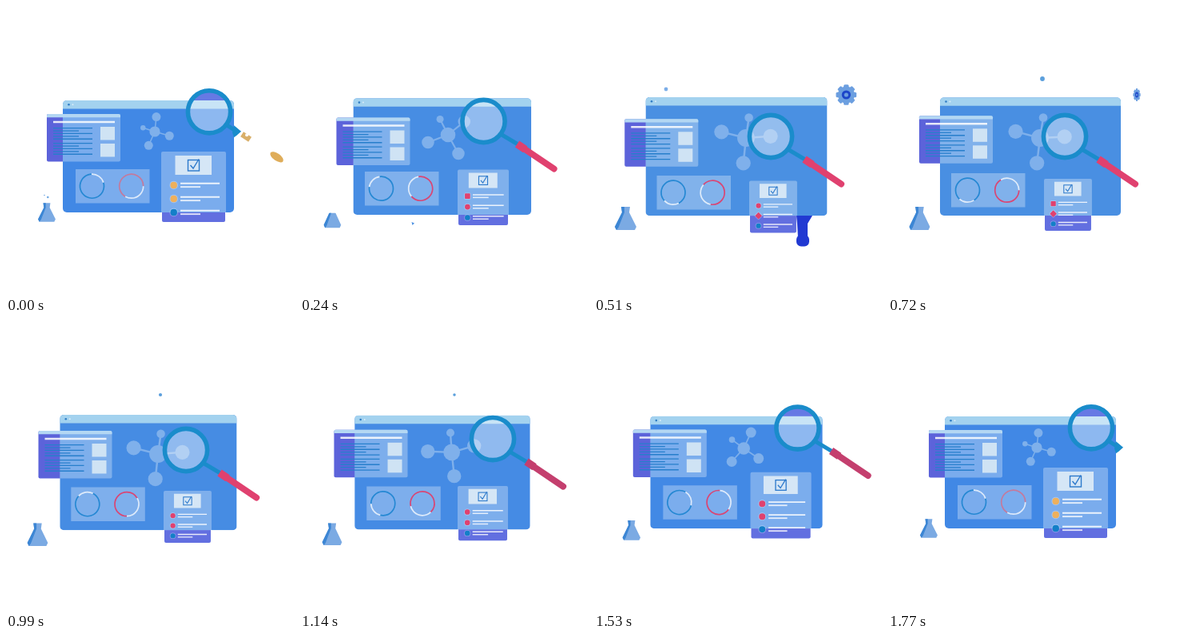
An HTML page with a canvas for the animation above (1800 ms loop, 360x360 px).

```html
<!DOCTYPE html>
<html lang="en">
<head>
<meta charset="utf-8">
<title>Research dashboard</title>
<style>
html, body { margin: 0; width: 100%; height: 100%; overflow: hidden; background: #fff; }
canvas { display: block; width: 360px; height: 360px; }
</style>
</head>
<body>
<canvas id="stage" width="360" height="360"></canvas>
<script>
const ctx = document.getElementById('stage').getContext('2d');
const LOOP = 1800, STEP = 30;
const TIMES = [0, 240, 510, 720, 990, 1290, 1770];
const PURPLE = '#5c63da', BLUE = '#1a8ccb', RED = '#e0416f', ORANGE = '#eeb05c';

// Monotone cubic through the pose values, at rest on both ends
function pose(t, v) {
  const last = TIMES.length - 1;
  if (t >= TIMES[last]) return v[last];
  let i = 0;
  while (t >= TIMES[i + 1]) i++;
  const sec = k => (v[k + 1] - v[k]) / (TIMES[k + 1] - TIMES[k]);
  const slope = k => {
    if (k === 0 || k === last) return 0;
    const a = sec(k - 1), b = sec(k);
    return a * b <= 0 ? 0 : 2 * a * b / (a + b);
  };
  const h = TIMES[i + 1] - TIMES[i], u = (t - TIMES[i]) / h, w = 1 - u;
  return v[i] * (1 + 2 * u) * w * w + slope(i) * h * u * w * w
    + v[i + 1] * u * u * (3 - 2 * u) - slope(i + 1) * h * u * u * w;
}

const white = a => `rgba(255,255,255,${a})`;
const within = (t, a, b) => t >= a && t < b;

function box(x, y, w, h, fill, r = 0) {
  ctx.fillStyle = fill;
  ctx.beginPath();
  ctx.roundRect(x, y, w, h, r);
  ctx.fill();
}

function disc(x, y, r, fill) {
  ctx.fillStyle = fill;
  ctx.beginPath();
  ctx.arc(x, y, r, 0, Math.PI * 2);
  ctx.fill();
}

function line(x1, y1, x2, y2, color, width, cap = 'butt') {
  ctx.strokeStyle = color;
  ctx.lineWidth = width;
  ctx.lineCap = cap;
  ctx.beginPath();
  ctx.moveTo(x1, y1);
  ctx.lineTo(x2, y2);
  ctx.stroke();
}

function arc(x, y, r, from, to, color, width) {
  ctx.strokeStyle = color;
  ctx.lineWidth = width;
  ctx.lineCap = 'butt';
  ctx.beginPath();
  ctx.arc(x, y, r, from, to);
  ctx.stroke();
}

function poly(points, fill) {
  ctx.fillStyle = fill;
  ctx.beginPath();
  points.forEach(([x, y]) => ctx.lineTo(x, y));
  ctx.closePath();
  ctx.fill();
}

function clipped(w, draw) {
  ctx.save();
  ctx.beginPath();
  ctx.roundRect(w.x, w.y, w.w, w.h, 5);
  ctx.clip();
  draw();
  ctx.restore();
}

function drawWindow(w) {
  const k = (w.w - 214) / 13;
  const mix = (a, b) => Math.round(a + (b - a) * k);
  clipped(w, () => {
    box(w.x, w.y, w.w, w.h, `rgb(${mix(65, 74)},${mix(136, 144)},${mix(229, 226)})`);
    box(w.x, w.y, w.w, 10.5, '#a3d2ef');
  });
  disc(w.x + 7.5, w.y + 5.3, 1.3, '#2f7cc4');
  disc(w.x + 12.5, w.y + 5.3, 1, white(0.6));
}

function drawMolecule(t) {
  const x = pose(t, [186, 185, 190, 190, 190, 189, 186]);
  const y = pose(t, [157, 161, 165, 165, 165, 160, 157]);
  const s = pose(t, [1, 1.41, 1.66, 1.66, 1.65, 1.45, 1]);
  const turn = pose(t, [0, 45, 80, 81, 80, 49, 0]);
  const color = '#7fb0eb';
  const nodes = [[-84, 18.5, 5.5], [16, 19, 5.5], [114, 19, 5.5], [198, 15.5, 3.2]];
  for (const [deg, dist, r] of nodes) {
    const a = (deg + turn) * Math.PI / 180;
    const nx = x + Math.cos(a) * dist * s, ny = y + Math.sin(a) * dist * s;
    line(x, y, nx, ny, color, 1.5 * s);
    disc(nx, ny, r * s, color);
  }
  disc(x, y, 6.6 * s, color);
}

function drawTextCard(x, y, w) {
  clipped(w, () => box(x, y, 92, 59.5, white(0.3), 2));
  box(x, y, 92, 4.3, '#b3d7f3', [2, 2, 0, 0]);
  box(x + 8, y + 8.7, 77, 2.6, white(0.85));
  for (const top of [17, 36]) {
    for (let i = 0; i < 5; i++) {
      box(x + 8, y + top + i * 3.4, i % 2 ? 32 : 49, 1.3, '#277fcc');
    }
  }
  for (const top of [16, 37]) box(x + 67, y + top, 18, 16.5, '#cfe3f4');
}

function drawRings(t) {
  const x = pose(t, [87, 81, 78.5, 79, 81.3, 85, 87]);
  const y = pose(t, [204, 207, 212, 209, 206.5, 205, 204]);
  const turns = [
    pose(t, [-55, -135, -260, -265, -460, -670, -775]),
    pose(t, [60, 200, 520, 660, 750, 910, 1140])
  ];
  const warm = within(t, 60, 1650) ? '#d94674' : '#c37a9d';
  box(x, y, 92.5, 42.5, white(0.3));
  turns.forEach((turn, i) => {
    const cx = x + 20.5 + i * 49.2, cy = y + 21.2;
    const mid = turn * Math.PI / 180, half = i ? 1.05 : 0.65;
    arc(cx, cy, 15, mid + half, mid - half + Math.PI * 2, i ? warm : '#2588d3', 1.7);
    arc(cx, cy, 15, mid - half, mid + half, white(0.75), 1.7);
  });
}

function drawMark(t, row) {
  const red = within(t, 60, 1620) ? RED : ORANGE;
  const square = row === 0 && (within(t, 150, 380) || within(t, 630, 850));
  const diamond = row === 1 && within(t, 400, 860);
  const r = square || diamond ? 1 : 4;
  ctx.save();
  if (diamond) ctx.rotate(Math.PI / 4);
  box(-5.2, -5.2, 10.4, 10.4, white(0.3), r + 1);
  box(-4.2, -4.2, 8.4, 8.4, row === 2 ? '#137fc8' : red, r);
  ctx.restore();
}

function drawListCard(t, c, w) {
  clipped(w, () => box(c.x, c.y, 81 * c.s, 88 * c.s, white(0.3), 2));
  ctx.save();
  ctx.translate(c.x, c.y);
  ctx.scale(c.s, c.s);
  box(17.5, 5, 45.5, 24, '#d5e6f6');
  ctx.strokeStyle = '#2c79cb';
  ctx.lineWidth = 1.4;
  ctx.strokeRect(33.5, 10.5, 14, 13.5);
  ctx.beginPath();
  ctx.moveTo(36.5, 17);
  ctx.lineTo(40, 21);
  ctx.lineTo(47, 9.5);
  ctx.stroke();
  for (let i = 0; i < 3; i++) {
    const y = 42 + i * 17;
    box(24, y - 3.2, 49, 1.9, white(0.85));
    box(24, y + 1.2, 25, 1.9, white(0.8));
    ctx.save();
    ctx.translate(15.7, y);
    drawMark(t, i);
    ctx.restore();
  }
  ctx.restore();
}

function drawLens(t, x, y, w) {
  const held = within(t, 60, 1650);
  clipped(w, () => disc(x, y, 27, white(0.4)));
  line(x + 22, y + 16.5, x + (held ? 43 : 36), y + (held ? 29 : 25.5), BLUE, 5);
  arc(x, y, 26.6, 0, Math.PI * 2, BLUE, 5.6);
  if (held) {
    const grip = within(t, 1140, 1650) ? '#c43f6e' : RED;
    line(x + 42, y + 28.5, x + 52, y + 35.2, grip, 9.5);
    line(x + 46, y + 31.2, x + 88, y + 59.5, grip, 8, 'round');
    return;
  }
  poly([[x + 31, y + 17], [x + 40, y + 24.5], [x + 35, y + 29], [x + 31, y + 32], [x + 29, y + 26]], BLUE);
  if (t < 60) {
    line(x + 41, y + 28, x + 51, y + 34.5, '#d9b06a', 7);
    disc(x + 47, y + 29, 2, '#fff');
    ctx.fillStyle = '#dfad5a';
    ctx.beginPath();
    ctx.ellipse(x + 84.5, y + 56.5, 9.5, 4.6, 0.6, 0, Math.PI * 2);
    ctx.fill();
  }
}

function drawFlask(t) {
  const x = pose(t, [51, 40.5, 39.5, 39.5, 39.5, 41.5, 51]);
  const y = pose(t, [269.7, 277.3, 280, 280, 280, 277.3, 269.7]);
  const sx = pose(t, [0.81, 0.8, 1, 0.96, 0.95, 0.87, 0.81]);
  const sy = pose(t, [0.81, 0.88, 1, 1, 0.98, 0.92, 0.81]);
  ctx.save();
  ctx.translate(x, y);
  ctx.scale(sx, sy);
  if (within(t, 120, 360)) {
    ctx.beginPath();
    ctx.rect(-20, -21, 40, 22);
    ctx.clip();
  }
  poly([[-5.5, -29], [5.5, -29], [4.5, -22], [13.5, -4], [11.5, 0], [-11.5, 0], [-13.5, -4], [-4.5, -22]], '#7baae3');
  poly([[-5.5, -29], [-1.5, -29], [-1.5, -22], [-9, -3], [-11.5, 0], [-13.5, -4], [-4.5, -22]], '#3c86d4');
  ctx.restore();
  if (t < 60) {
    disc(48, 236.5, 0.8, '#6fa8e2');
    disc(52.3, 239, 1.3, '#6fa8e2');
  }
}

function drawGear(t) {
  if (!within(t, 390, 810)) return;
  ctx.save();
  ctx.translate(pose(t, [315, 315, 315.3, 311, 311, 311, 311]), 111);
  ctx.scale(pose(t, [1, 1, 1, 0.36, 0.36, 1, 1]), pose(t, [1, 1, 1, 0.62, 0.6, 1, 1]));
  for (let i = 0; i < 8; i++) {
    ctx.rotate(Math.PI / 4);
    box(-3.2, -12.8, 6.4, 8, '#6c9fe0', 1.5);
  }
  disc(0, 0, 10.5, '#6c9fe0');
  disc(0, 0, 5.6, '#1c45c9');
  disc(0, 0, 2.6, '#6c9fe0');
  ctx.restore();
}

function drawTube(t) {
  if (!within(t, 420, 660)) return;
  poly([[253, 262], [273, 262], [267, 272], [267, 290], [255, 290], [254, 272]], '#2139d2');
  box(253, 286, 16, 14.5, '#2139d2', 6);
}

function drawSpecks(t) {
  if (within(t, 150, 330)) poly([[139.5, 270], [143, 271.5], [140.5, 274]], '#4a90e2');
  if (within(t, 390, 600)) disc(90, 104, 2.4, '#7caee8');
  if (within(t, 570, 1500)) {
    disc(193, 91, pose(t, [2.9, 2.9, 2.9, 2.9, 2.1, 1.5, 1]), '#5b9fdc');
  }
}

function draw(t) {
  ctx.fillStyle = '#fff';
  ctx.fillRect(0, 0, 360, 360);

  const left = pose(t, [71, 66.5, 64.5, 65, 67.3, 69, 71]);
  const right = pose(t, [285, 289, 291.5, 291, 288.5, 287, 285]);
  const top = pose(t, [118, 115.3, 114, 114.2, 116, 117.3, 118]);
  const bottom = pose(t, [258, 261, 262.3, 262, 260.3, 259, 258]);
  const win = { x: left, y: top, w: right - left, h: bottom - top };

  const cardX = pose(t, [51, 45.5, 38.3, 39, 40.5, 45, 51]);
  const cardY = pose(t, [135, 139.5, 141.3, 137.3, 136, 134, 135]);
  const list = {
    x: pose(t, [194, 197, 194, 195, 197, 197, 194]),
    y: pose(t, [182, 204.5, 218.5, 216, 211, 198, 182]),
    s: pose(t, [1, 0.79, 0.74, 0.74, 0.74, 0.84, 1])
  };
  const lensX = pose(t, [254, 229.5, 221, 221, 225, 255, 254]);
  const lensY = pose(t, [132.3, 144, 163, 163, 160, 133.3, 132.3]);

  drawTube(t);
  box(cardX, cardY, 92, 59.5, PURPLE, 2);
  box(list.x + 1, list.y, 81 * list.s - 2, 88 * list.s, '#626fe0', 2);
  disc(lensX, lensY, 27, '#6679e4');
  drawWindow(win);
  drawMolecule(t);
  drawTextCard(cardX, cardY, win);
  drawRings(t);
  drawListCard(t, list, win);
  drawLens(t, lensX, lensY, win);
  drawFlask(t);
  drawGear(t);
  drawSpecks(t);
}

const start = performance.now();
function tick() {
  const t = (performance.now() - start) % LOOP;
  draw(Math.floor(t / STEP) * STEP);
  requestAnimationFrame(tick);
}
tick();
</script>
</body>
</html>
```
